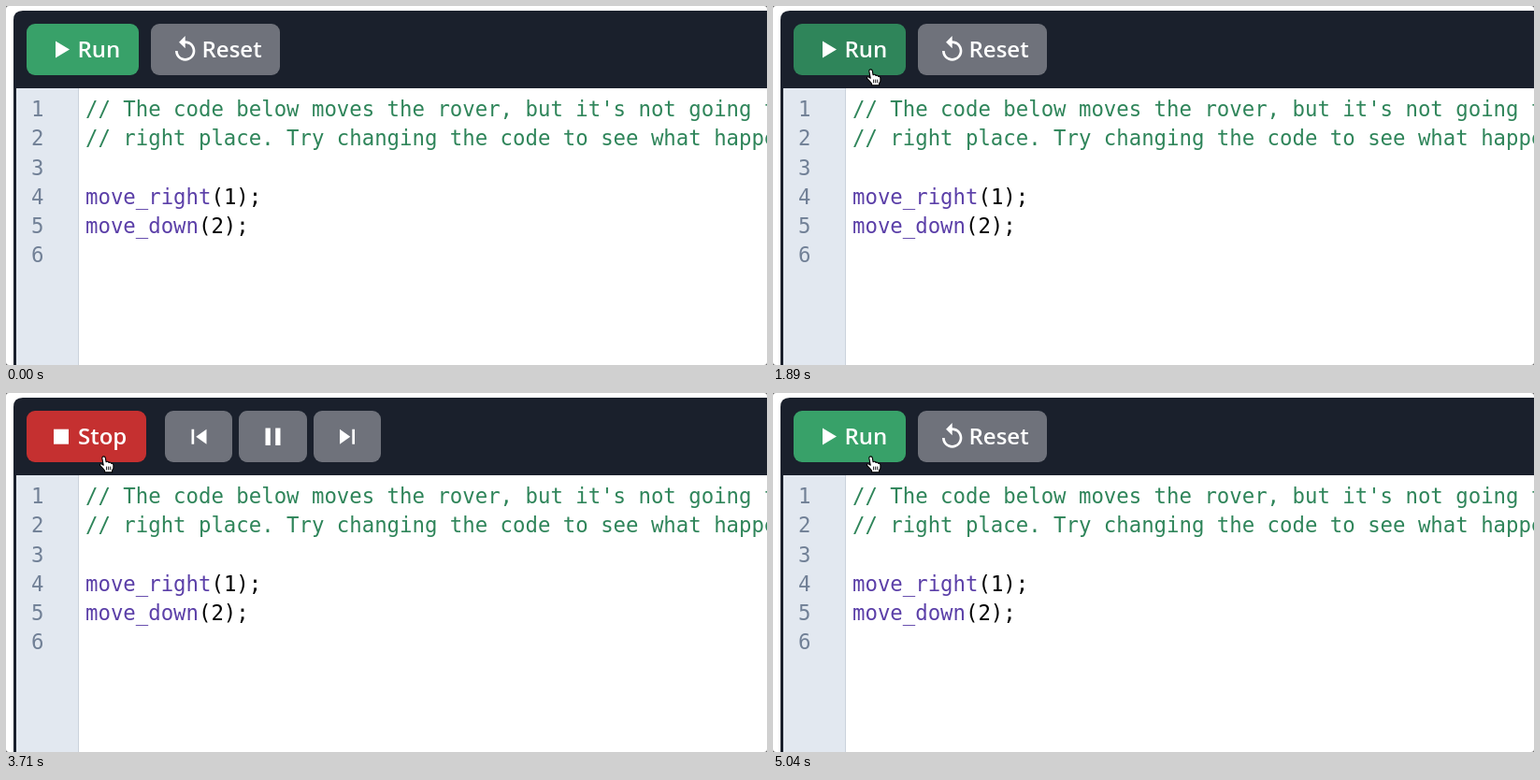
An HTML page that plays this animation: 814 by 384 pixels, repeating every 5.11 s.

```html
<!DOCTYPE html>
<html lang="en">
<head>
<meta charset="utf-8">
<title>Code editor</title>
<style>
  html, body { margin: 0; width: 100%; height: 100%; overflow: hidden; background: #666; }
  svg { display: block; width: 814px; height: 384px; }
  .label { font: 600 24px "Open Sans", "Noto Sans", sans-serif; fill: #fff; }
  .code { font: 22.33px "DejaVu Sans Mono", monospace; }
  .icon { fill: #fff; }
  .grey { fill: #6f727b; }
  .comment { fill: #2f855a; }
  .call { fill: #5b3fa8; }
  .number { fill: #718096; }
</style>
</head>
<body>
<svg viewBox="0 0 814 384">
  <rect width="814" height="384" rx="3" fill="#fff"/>
  <path d="M8 384V15Q8 5 18 5H814V88H11V384Z" fill="#1a202c"/>
  <rect x="11" y="88" width="66" height="296" fill="#e2e8f0"/>
  <rect x="77" y="88" width="1" height="296" fill="#cbd2dc"/>
  <rect x="78" y="88" width="736" height="293" fill="#fff"/>

  <g id="marker" fill="#4299e1">
    <path d="M55 196L71 204.5L55 213Z"/>
    <rect x="85" y="190" width="188" height="29" fill="#bee3f8"/>
    <rect x="85" y="218.3" width="188" height="2.7"/>
  </g>
  <g id="code" class="code"></g>

  <g id="idle">
    <rect id="run" x="22" y="19" width="120" height="55" rx="9"/>
    <path class="icon" d="M53 37.5L68 46.5L53 55.5Z"/>
    <text class="label" x="76.5" y="54.5">Run</text>
    <rect class="grey" x="155" y="19" width="138" height="55" rx="9"/>
    <path class="icon" transform="translate(175.7 30.7) scale(1.333)"
      d="M12 5V1L7 6l5 5V7c3.31 0 6 2.69 6 6s-2.69 6-6 6-6-2.69-6-6H4c0 4.42 3.58 8 8 8s8-3.58 8-8-3.58-8-8-8z"/>
    <text class="label" x="209.5" y="54.5">Reset</text>
  </g>

  <g id="playing">
    <rect id="stop" x="22" y="19" width="128" height="55" rx="9"/>
    <rect class="icon" x="51" y="38.7" width="16" height="16"/>
    <text class="label" x="77" y="54.5">Stop</text>
    <g class="grey">
      <rect x="170" y="19" width="72" height="55" rx="9"/>
      <rect x="249" y="19" width="73" height="55" rx="9"/>
      <rect x="329" y="19" width="72" height="55" rx="9"/>
    </g>
    <g class="icon">
      <path d="M198.5 38.7h2.7v16h-2.7zM203.2 46.7L214.5 38.7v16z"/>
      <path d="M277.5 37.4h5.3v18.6h-5.3zM288.2 37.4h5.3v18.6h-5.3z"/>
      <path d="M357 38.7L368.3 46.7L357 54.7zM370.3 38.7h2.7v16h-2.7z"/>
    </g>
  </g>

  <g id="ring" fill="none">
    <circle cx="105" cy="68" r="28.2" stroke="#fff" stroke-width="5.6"/>
    <circle cx="105" cy="68" r="28.4" stroke="#000" stroke-width="2.8"/>
  </g>
  <g id="beam" fill="none" stroke-linecap="round">
    <path id="beamShape" d="M-3-7.5Q0-7.5 0-5.5Q0-7.5 3-7.5M0-5.5V5.5M-3 7.5Q0 7.5 0 5.5Q0 7.5 3 7.5M-1.5 2.5H1.5"
      stroke="#fff" stroke-width="3"/>
    <use href="#beamShape" style="stroke:#000"/>
    <path d="M-3-7.5Q0-7.5 0-5.5Q0-7.5 3-7.5M0-5.5V5.5M-3 7.5Q0 7.5 0 5.5Q0 7.5 3 7.5M-1.5 2.5H1.5"
      stroke="#000" stroke-width="1.3"/>
  </g>
  <g id="hand" stroke="#000" stroke-linejoin="round" stroke-linecap="round">
    <path fill="#fff" stroke-width="1.1" d="M-2.2 1.6C-2.3-.6 .9-.7 1.3 1.4L2.1 5.8C2.9 4.9 4.6 5.2 5 6.5
      C5.9 5.7 7.3 6.2 7.7 7.4C8.7 6.9 9.9 7.6 9.9 9.2V12.5L8.6 14.8V16.8H.6V15.2L-1.6 12.4L-4.4 9.5
      C-5.2 8 -3.2 7.2-2.2 8.3L-.8 9.2Z"/>
    <path fill="none" stroke-width=".9" d="M2.6 11V14M4.7 11V14M6.8 11V14"/>
  </g>
</svg>
<script>
const STEP = 70, LOOP = 5110, LINE = 31.2;
const $ = id => document.getElementById(id);

const LINES = [
  [["comment", "// The code below moves the rover, but it's not going to the"]],
  [["comment", "// right place. Try changing the code to see what happens."]],
  [],
  [["call", "move_right"], ["", "(1);"]],
  [["call", "move_down"], ["", "(2);"]],
  []
];
$("code").innerHTML = LINES.map((parts, i) => {
  const y = 118.2 + i * LINE;
  const spans = parts.map(([kind, text]) => `<tspan class="${kind}">${text}</tspan>`).join("");
  return `<text class="number" x="27" y="${y}">${i + 1}</text><text x="85" y="${y}">${spans}</text>`;
}).join("");
document.querySelector("#beam use").remove();

const between = (t, a, b) => t >= a && t < b;
const show = (id, on) => $(id).style.display = on ? "" : "none";
const progress = (t, start, length) => Math.min(1, Math.max(0, (t - start) / length));

function mix(from, to, p) {
  return `rgb(${from.map((v, i) => Math.round(v + (to[i] - v) * p))})`;
}

const GREEN = [56, 161, 105], HOVER = [47, 133, 90], PRESSED = [39, 103, 73];
const RED = [229, 62, 62], RED_HOVER = [197, 48, 48];

function runColor(t) {
  if (t >= 5040) return mix(GREEN, GREEN, 0);
  if (t < 2310) return mix(GREEN, HOVER, progress(t, 1610, 280));
  return mix(HOVER, PRESSED, progress(t, 2240, 280));
}

function drawCursor(t) {
  const left = 1 - progress(t, 1120, 560);
  const x = 105 - 15 * left ** 1.65;
  const y = 68 + 281 * left ** 2.16;
  const overText = y > 88;
  show("beam", t >= 1120 && overText);
  show("hand", t >= 1120 && !overText);
  for (const id of ["beam", "hand"]) $(id).setAttribute("transform", `translate(${x} ${y})`);
}

function draw(time) {
  const t = Math.floor(time % LOOP / STEP) * STEP;
  const playing = between(t, 2940, 5040);
  show("idle", !playing);
  show("playing", playing);
  $("run").style.fill = runColor(t);
  $("stop").style.fill = mix(RED, RED_HOVER, progress(t, 2940, 140));

  show("marker", between(t, 3920, 5040));
  const second = t >= 4970;
  $("marker").setAttribute("transform", `translate(0 ${second ? LINE : 0})`);
  for (const bar of $("marker").querySelectorAll("rect")) bar.setAttribute("width", second ? 174.6 : 188);

  show("ring", between(t, 2310, 2730) || between(t, 4900, 5040));
  drawCursor(t);
}

const start = performance.now();
function tick() {
  draw(performance.now() - start);
  requestAnimationFrame(tick);
}
tick();
</script>
</body>
</html>
```
